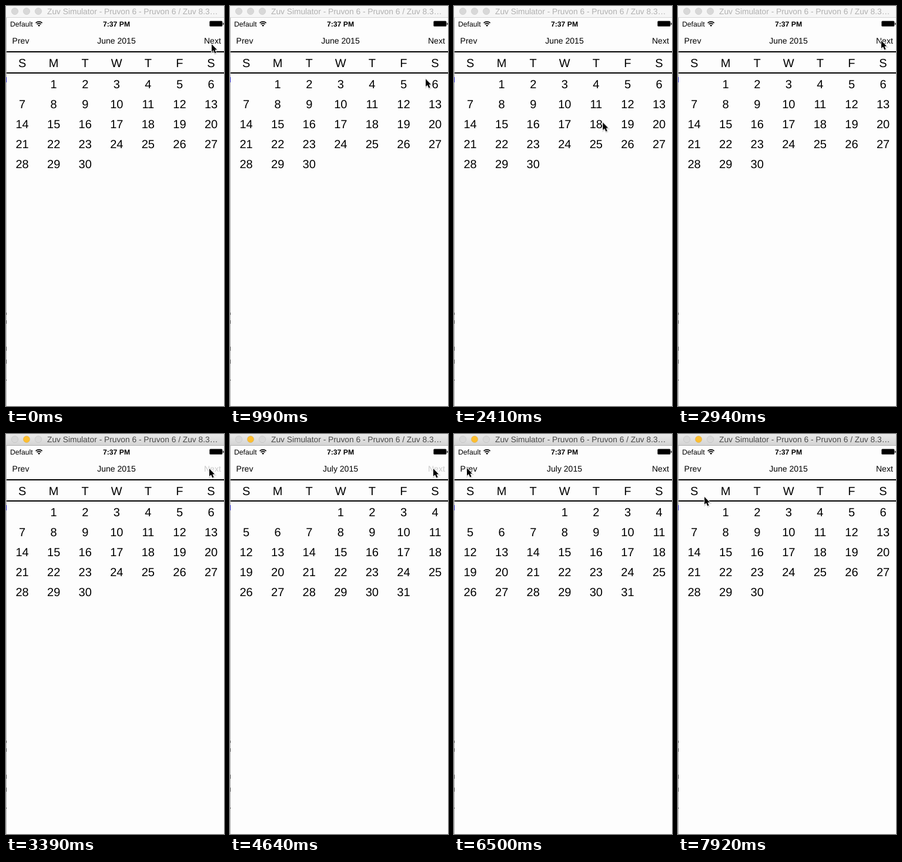
These frames come from a looping animation (371 px wide and 681 px high, 8000 ms). An HTML page:

```html
<!DOCTYPE html>
<html lang="en">
<head>
<meta charset="utf-8">
<title>Calendar</title>
<style>
  html, body { margin: 0; width: 100%; height: 100%; overflow: hidden; background: #fdfdfd; }
  svg { display: block; width: 371px; height: 681px; font-family: "Liberation Sans", Arial, sans-serif; text-rendering: geometricPrecision; }
  .label { font-size: 14px; }
  .day { font-size: 20px; text-anchor: middle; }
  .status { font-size: 12.2px; }
  .window-title { font-size: 13.75px; }
</style>
</head>
<body>
<svg id="stage" viewBox="0 0 371 681">
  <defs>
    <linearGradient id="activeBar" x2="0" y2="1">
      <stop offset="0" stop-color="#eaeaea"/>
      <stop offset="1" stop-color="#d3d3d3"/>
    </linearGradient>
  </defs>
  <rect width="371" height="681" fill="#fdfdfd"/>

  <!-- window edge, with slivers of the page behind it -->
  <path d="M0 20h1v661h-1z" fill="#b2b2b2"/>
  <path d="M0 121h1v9h-1z" fill="#2020c0"/>
  <path d="M.5 522v4m0 9v6m0 39v7m0 15v7m0 27v2" stroke="#444"/>

  <!-- status bar -->
  <text class="status" x="7" y="34.5">Default</text>
  <path d="M50.6 28.9a7.8 7.8 0 0 1 11 0M52.6 31.1a4.9 4.9 0 0 1 7 0" fill="none" stroke="#000" stroke-width="1.7"/>
  <path d="M56.1 35.1l-2-2.1a2.9 2.9 0 0 1 4 0z"/>
  <text class="status" x="188" y="34.5" text-anchor="middle" font-weight="bold">7:37 PM</text>
  <rect x="346.4" y="25.5" width="21.9" height="9.3" rx="1.5"/>
  <rect x="369" y="28.6" width="1.3" height="3.4" rx=".6"/>

  <!-- navigation -->
  <text class="label" id="prev" x="10.6" y="64">Prev</text>
  <text class="label" id="next" x="337" y="64">Next</text>
  <path d="M1 77h370v2H1zM1 113h370v2H1z"/>
</svg>

<script>
const LOOP = 8000;
const PRESS_TIME = 170;
const stage = document.getElementById('stage');

function add(parent, tag, attrs, text) {
  const el = document.createElementNS('http://www.w3.org/2000/svg', tag);
  for (const key in attrs) el.setAttribute(key, attrs[key]);
  if (text !== undefined) el.textContent = text;
  return parent.appendChild(el);
}

// Holds each value until the next time in [[ms, value], ...].
function hold(el, property, steps) {
  const frames = steps.map(([time, value]) =>
    ({ offset: time / LOOP, [property]: value, easing: 'step-end' }));
  frames.push({ offset: 1, [property]: steps[steps.length - 1][1] });
  el.animate(frames, { duration: LOOP, iterations: Infinity });
}

const presses = [
  { time: 3390, button: 'next', turn: 1 },
  { time: 4640, button: 'next', turn: 1 },
  { time: 6320, button: 'prev', turn: -1 },
  { time: 7400, button: 'prev', turn: -1 }
];

function titleBar(look) {
  const bar = add(stage, 'g', {});
  add(bar, 'rect', { width: 371, height: 20, fill: look.fill });
  add(bar, 'rect', { y: 19, width: 371, height: 1, fill: look.line });
  [look.light, look.middle, look.light].forEach((fill, i) => add(bar, 'circle', {
    cx: 15 + 20 * i, cy: 9, r: 5.7, fill, stroke: '#000', 'stroke-opacity': .1, 'stroke-width': .8
  }));
  add(bar, 'text', { class: 'window-title', x: 70, y: 14.2, fill: look.text },
    'Zuv Simulator - Pruvon 6 - Pruvon 6 / Zuv 8.3…');
  return bar;
}

// The first press gives the window focus.
const idleBar = titleBar({ fill: '#f6f6f6', line: '#d6d6d6', text: '#b0b0b0', light: '#d8d8d8', middle: '#d8d8d8' });
const activeBar = titleBar({ fill: 'url(#activeBar)', line: '#b4b4b4', text: '#484848', light: '#d9d9d9', middle: '#fdbe30' });
hold(idleBar, 'opacity', [[0, 1], [presses[0].time, 0]]);
hold(activeBar, 'opacity', [[0, 0], [presses[0].time, 1]]);

for (const button of ['prev', 'next']) {
  const steps = [[0, 1]];
  for (const press of presses.filter(p => p.button === button))
    steps.push([press.time, .2], [press.time + PRESS_TIME, 1]);
  hold(document.getElementById(button), 'opacity', steps);
}

const columnX = i => .8 + 375 / 7 * (i + .5);
[...'SMTWTFS'].forEach((name, i) =>
  add(stage, 'text', { class: 'day', x: columnX(i), y: 104 }, name));

function monthPage(name, month) {
  const page = add(stage, 'g', {});
  const firstColumn = new Date(2015, month, 1).getDay();
  const days = new Date(2015, month + 1, 0).getDate();
  add(page, 'text', { class: 'label', x: 188, y: 64, 'text-anchor': 'middle' }, name + ' 2015');
  for (let day = 1; day <= days; day++) {
    const cell = firstColumn + day - 1;
    add(page, 'text', {
      class: 'day', x: columnX(cell % 7), y: 140 + 34 * Math.floor(cell / 7)
    }, day);
  }
  return page;
}

['June', 'July', 'August'].forEach((name, index) => {
  let shown = 0;
  const steps = [[0, index === shown ? 1 : 0]];
  for (const { time, turn } of presses) {
    shown += turn;
    steps.push([time + PRESS_TIME, index === shown ? 1 : 0]);
  }
  hold(monthPage(name, 5 + index), 'opacity', steps);
});

const pointer = add(stage, 'g', {});
const arrow = 'M0 0V13L3 10.3L5.3 15.6L7.6 14.6L5.4 9.5H9.2Z';
add(pointer, 'path', { d: arrow, transform: 'translate(.4 1)', fill: 'none', stroke: '#000', 'stroke-opacity': .15, 'stroke-width': 2.4 });
add(pointer, 'path', { d: arrow, stroke: '#fff', 'stroke-width': 1.8, 'paint-order': 'stroke', 'stroke-linejoin': 'round' });

// Each move follows a quadratic curve through evenly timed steps.
const moves = [
  { start: 90, end: 180, count: 2, via: [350, 65], to: [349, 64] },
  { start: 990, end: 1790, count: 10, via: [265, 381], to: [265, 381] },
  { start: 1970, end: 2760, count: 10, via: [200, 220], to: [319, 88] },
  { start: 2850, end: 2940, count: 2, via: [335, 70], to: [346, 59] },
  { start: 5180, end: 5360, count: 3, via: [190, 63], to: [34, 67] },
  { start: 5450, end: 5790, count: 5, via: [-8, 60], to: [22, 58] },
  { start: 7840, end: 7920, count: 2, via: [28, 75], to: [45, 107] }
];

const place = ([x, y]) => `translate(${x}px, ${y}px)`;
let from = [350, 65];
const track = [[0, place(from)]];
for (const { start, end, count, via, to } of moves) {
  for (let i = 0; i < count; i++) {
    const t = (i + 1) / count;
    const point = from.map((a, k) => a * (1 - t) ** 2 + 2 * via[k] * t * (1 - t) + to[k] * t * t);
    track.push([start + (end - start) * i / (count - 1), place(point)]);
  }
  from = to;
}
hold(pointer, 'transform', track);
</script>
</body>
</html>
```
